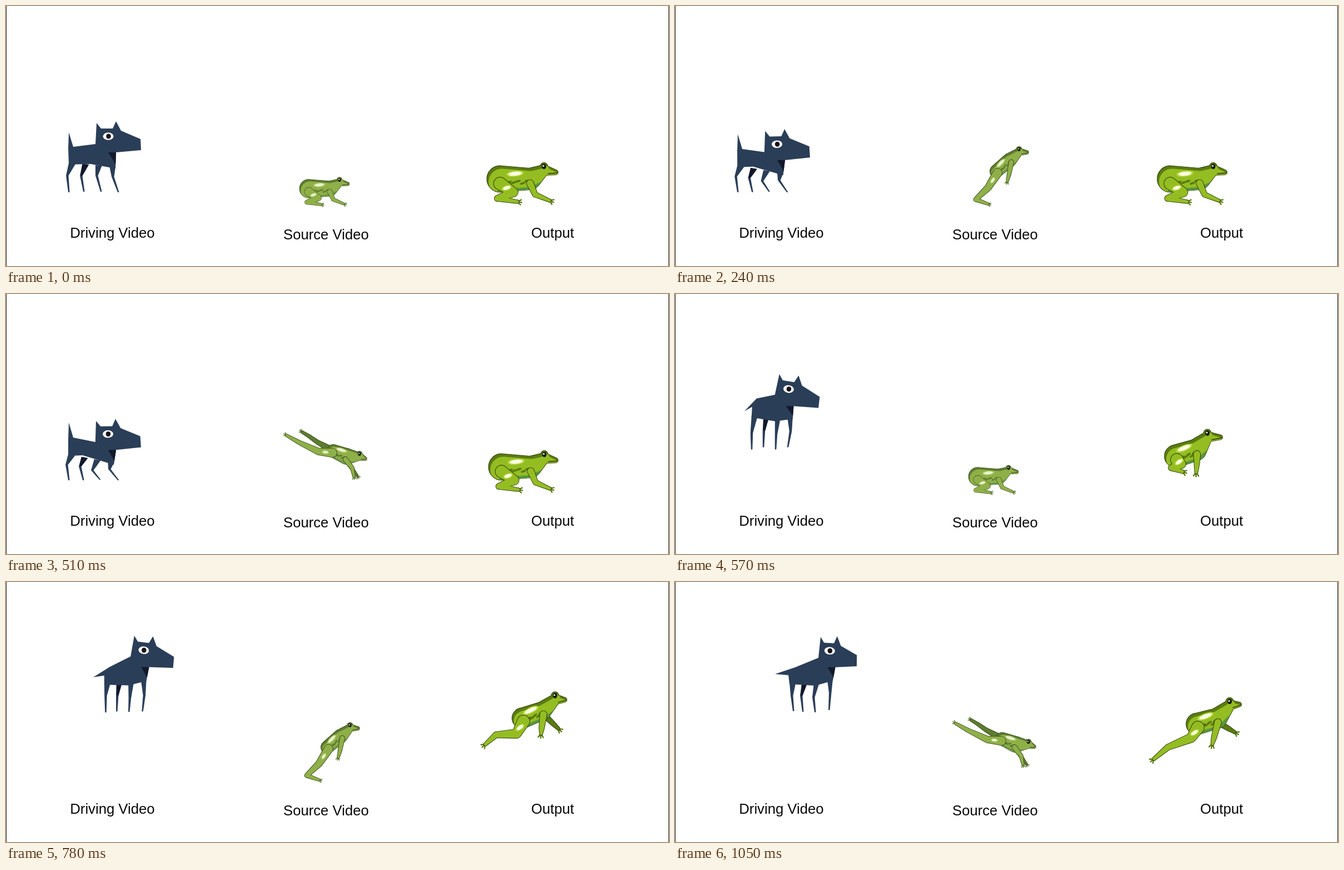
These frames come from a looping animation (1193x469 px, 1.08 s). An HTML page with a canvas:

```html
<!DOCTYPE html>
<html lang="en">
<head>
<meta charset="utf-8">
<title>Driving, source and output</title>
<style>
  html, body { margin: 0; width: 100%; height: 100%; overflow: hidden; background: #fff; }
  #stage { position: relative; width: 1193px; height: 469px; box-sizing: border-box;
    border: solid #2b2b2b; border-width: 0 1px; }
  canvas, svg { position: absolute; left: -1px; top: 0; }
  svg { font: 25.7px "Liberation Sans", Arial, sans-serif; fill: #080808; }
</style>
</head>
<body>
<div id="stage">
  <canvas id="view" width="1193" height="469"></canvas>
  <svg width="1193" height="469">
    <text x="115.3" y="418">Driving Video</text>
    <text x="499" y="421">Source Video</text>
    <text x="945" y="418">Output</text>
  </svg>
</div>
<script>
const LOOP = 1080, STEP = 30;
const ctx = document.getElementById('view').getContext('2d');

const lerp = (a, b, k) => a + (b - a) * k;
const between = (p, q, k) => [lerp(p[0], q[0], k), lerp(p[1], q[1], k)];
const pairs = (list) => list.flatMap((v, i) => i % 2 ? [] : [[v, list[i + 1]]]);

function dot(x, y, rx, ry, color, turn = 0) {
  ctx.fillStyle = color;
  ctx.beginPath();
  ctx.ellipse(x, y, rx, ry, turn, 0, 7);
  ctx.fill();
}

function polygon(points, color) {
  ctx.fillStyle = color;
  ctx.beginPath();
  for (const [x, y] of points) ctx.lineTo(x, y);
  ctx.fill();
}

// Tapered tube through joints [x, y] with one radius each.
function tube(joints, radii) {
  const path = new Path2D();
  joints.forEach(([x, y], i) => {
    const r = radii[i];
    path.moveTo(x + r, y);
    path.arc(x, y, r, 0, 2 * Math.PI);
    if (!i) return;
    const [px, py] = joints[i - 1], pr = radii[i - 1];
    const a = Math.atan2(y - py, x - px);
    const lean = Math.acos(Math.max(-1, Math.min(1, (pr - r) / Math.hypot(x - px, y - py))));
    const at = (cx, cy, cr, t) => [cx + cr * Math.cos(t), cy + cr * Math.sin(t)];
    path.moveTo(...at(px, py, pr, a - lean));
    path.lineTo(...at(x, y, r, a - lean));
    path.lineTo(...at(x, y, r, a + lean));
    path.lineTo(...at(px, py, pr, a + lean));
    path.closePath();
  });
  return path;
}

// Frog poses. spine: rump, chest, head, snout; leg: knee, ankle, toe; arm: elbow, hand.
const frog = (size, thick, spine, leg, arm, farHand, farLeg) =>
  ({ size, thick, spine: pairs(spine), leg: pairs(leg), arm: pairs(arm), farHand, farLeg: farLeg && pairs(farLeg) });

const sit = frog(1, [23.5, 19], [889, 312, 943, 312, 968, 296, 989, 300], [913, 336, 884, 347, 920, 353], [952, 340, 978, 351]);
const crouch = frog(0.7, [14, 13], [555, 318, 572, 302, 589, 285, 603, 282], [564, 341, 539, 346, 563, 357], [580, 322, 581, 347]);
const leapOff = frog(0.7, [11, 12], [578, 298, 602, 278, 619, 263, 633, 264], [563, 328, 541, 349, 563, 357], [601, 304, 598, 316]);
const stretch = frog(0.7, [10, 10], [588, 277, 622, 267, 644, 251, 656, 251], [560, 300, 527, 324, 500, 345], [616, 285, 614, 294], [625, 294]);
const leap = frog(0.7, [13, 13], [574, 260, 611, 259, 632, 266, 641, 271], [562, 284, 533, 299, 521, 316], [606, 282, 603, 294], [630, 290], [552, 267, 514, 271, 501, 283]);
const dive = frog(0.7, [11, 14], [589, 283, 613, 293, 636, 293, 646, 297], [562, 284, 528, 268, 505, 255], [623, 314, 626, 329], [632, 328], [560, 267, 546, 257, 533, 249]);
const rise = frog(1, [20, 19], [910, 270, 946, 259, 967, 235, 990, 236], [920, 284, 902, 291, 922, 298], [948, 284, 947, 299]);
const soar = frog(1, [18, 16], [940, 240, 976, 227, 999, 206, 1016, 207], [930, 268, 893, 270, 874, 287], [975, 258, 974, 268], [1005, 259]);
const glide = frog(1, [19, 18], [939, 256, 975, 246, 998, 222, 1015, 221], [929, 281, 887, 298, 862, 319], [970, 280, 967, 292], [1007, 271]);

const pale = { main: '#8fb048', dark: '#5d7c2e', belly: '#6c9a4b', shine: '#e9f1cd', glow: '#aecb6b', line: '#3b4922' };
const vivid = { main: '#94bd22', dark: '#5a7b10', belly: '#579540', shine: '#fcffe8', glow: '#b6da3e', line: '#28350a' };

function drawFrog({ size: w, thick, spine, leg, arm, farHand, farLeg }, ink) {
  const [rump, chest, head, snout] = spine;
  const turn = Math.atan2(chest[1] - rump[1], chest[0] - rump[0]);
  const below = ([x, y], d) => [x - d * Math.sin(turn), y + d * Math.cos(turn)];
  const hip = below(rump, thick[0] * 0.35), shoulder = below(chest, thick[1] * 0.4);

  const shape = (path, color) => {
    ctx.lineWidth = 1.8;
    ctx.strokeStyle = ink.line;
    ctx.stroke(path);
    ctx.fillStyle = color;
    ctx.fill(path);
  };
  const stroke = (points, color, width) => {
    ctx.strokeStyle = color;
    ctx.lineWidth = width;
    ctx.beginPath();
    for (const p of points) ctx.lineTo(...p);
    ctx.stroke();
  };
  const limb = (joints, radii, color) => {
    const [p, q] = joints.slice(-2), a = Math.atan2(q[1] - p[1], q[0] - p[0]);
    for (const spread of [-0.6, 0, 0.6]) {
      const tip = [q[0] + 8 * w * Math.cos(a + spread), q[1] + 8 * w * Math.sin(a + spread)];
      stroke([q, tip], ink.dark, 2.4 * w);
    }
    shape(tube(joints, radii.map((r) => r * w)), color);
  };
  const gleam = ([x, y], rx, ry, angle) => {
    dot(x, y, rx * 1.3, ry * 1.5, ink.glow, angle);
    dot(x, y, rx, ry, ink.shine, angle);
  };

  ctx.lineCap = ctx.lineJoin = 'round';
  if (farLeg) limb([rump, ...farLeg], [8, 5, 4, 3], ink.dark);
  if (farHand) limb([shoulder, between(shoulder, farHand, 0.6), farHand], [5, 4, 2.5], ink.dark);

  const eye = [head[0], head[1] - 6.5 * w];
  const torso = tube(spine, [...thick, 9 * w, 4 * w]);
  torso.addPath(tube([head, eye], [8 * w, 6.5 * w]));
  shape(torso, ink.dark);
  ctx.save();
  ctx.clip(torso);
  ctx.translate(3 * w, 5 * w);
  ctx.fillStyle = ink.main;
  ctx.fill(torso);
  ctx.translate(-3 * w, -5 * w);
  stroke([below(rump, thick[0]), below(chest, thick[1]), between(chest, snout, 0.7).map((v, i) => v + i * 13 * w)], ink.belly, 9 * w);
  for (let i = 0; i < 6; i++) {
    const [x, y] = below(between(rump, chest, 0.3 + i * 0.15), thick[1] * (0.3 + 0.12 * Math.sin(i * 9)));
    dot(x, y, 5 * w, 2 * w, ink.dark, turn - 0.3);
  }
  gleam(below(between(rump, chest, 0.5), -thick[1] * 0.5), 12 * w, 3.6 * w, turn - 0.1);
  ctx.restore();

  limb([hip, ...leg], [11, 8, 5, 2.8], ink.main);
  gleam(between(hip, leg[0], 0.5), 7 * w, 3 * w, turn - 0.3);
  limb([shoulder, ...arm], [6, 4.5, 2.5], ink.main);
  stroke([between(head, snout, 0.35).map((v, i) => v + i * 5 * w), [snout[0] + 3 * w, snout[1] + w]], ink.line, 1.5 * w);
  dot(eye[0], eye[1], 4 * w, 4.8 * w, '#14180a');
  dot(eye[0] - w, eye[1] - w, 1.6 * w, 1.6 * w, '#fff');
}

function place(pose, ink, dx, dy, sx = 1, sy = 1) {
  ctx.save();
  ctx.transform(sx, 0, 0, sy, dx, dy);
  drawFrog(pose, ink);
  ctx.restore();
}

// Dog pose: ear tip, tilt, head width; chest, belly, rump, hip, tail tip, tail root; knees; feet.
const stand = [163, 211, 0, 1, 197, 293, 152, 285, 113, 286, 112, 257, 113, 228, 121, 254,
  110, 306, 135, 306, 163, 306, 192, 308, 113, 336, 140, 335, 171, 335, 202, 336];
const duck = [162, 229, -0.02, 1, 194, 308, 138, 291, 112, 292, 112, 262, 113, 232, 121, 259,
  109, 308, 133, 311, 155, 318, 186, 316, 113, 336, 139, 336, 169, 335, 202, 336];
const hop = [208, 122, 0.16, 0.99, 232, 203, 200, 207, 158, 200, 159, 181, 145, 189, 167, 166,
  158, 228, 180, 224, 202, 230, 228, 225, 158, 258, 179, 254, 201, 258, 223, 254];
const peak = [248, 91, 0.1, 0.95, 268, 173, 237, 182, 191, 182, 190, 166, 166, 168, 202, 150,
  195, 200, 215, 200, 238, 205, 264, 200, 195, 230, 214, 229, 236, 229, 262, 229];
const fall = [262, 99, 0.06, 0.85, 284, 178, 252, 187, 206, 184, 204, 168, 180, 166, 216, 154,
  210, 205, 227, 205, 249, 208, 279, 200, 213, 233, 230, 234, 252, 235, 277, 231];
const launch = hop.map((v, i) => i === 2 || i === 3 ? v : v + (i % 2 ? 30 : -27));
const skull = pairs([-2, 38, 0, 0, 8, 10, 29, 10, 35, -3, 44, 14, 79, 29, 80, 49, 35, 53]);
const hips = [[0, 0.15], [0.29, 0.43], [0.57, 0.71], [0.87, 1]];

const mix = (a, b, kx, ky) => a.map((v, i) => lerp(v, b[i], i % 2 ? ky : kx));
const settle = (t) => 1 - (1 - Math.min(1, t / 390)) ** 1.74;

// Blends four stops of the jump: slowing on the way up, speeding up on the way down.
function jump(t, a, b, c, d) {
  if (t < 660) return mix(a, b, (t - 540) / 120, (t - 540) / 120);
  if (t < 870) { const k = (t - 660) / 210; return mix(b, c, k, 1 - (1 - k) ** 2); }
  const k = (t - 870) / 180;
  return mix(c, d, k, k * k);
}

function drawDog(t) {
  const p = t < 540 ? mix(stand, duck, settle(t), settle(t)) : jump(t, launch, hop, peak, fall);
  const [x0, y0, tilt, width] = p;
  const [chest, belly, rump, hip, tip, root, ...legs] = pairs(p.slice(4));
  const navy = '#2a3e58', night = '#13182b';
  const onHead = ([x, y]) => [
    x0 + x * width * Math.cos(tilt) - y * Math.sin(tilt),
    y0 + x * width * Math.sin(tilt) + y * Math.cos(tilt)
  ];
  for (const n of [1, 0, 2, 3]) {
    const [a, b] = hips[n].map((k) => between(rump, chest, k)).map(([x, y]) => [x, y - 3]);
    const [kx, ky] = legs[n], [fx, fy] = legs[n + 4];
    polygon([a, [kx - 2, ky], [fx - 1, fy], [fx + 1.5, fy], [kx + 2.5, ky], b], navy);
    if (n === 1) polygon([a, [kx - 1, ky], [kx + 2.5, ky], b], night);
  }
  const head = skull.map(onHead), jaw = head[8];
  polygon([...head, chest, between(chest, belly, 0.6), belly, rump, hip, tip, root], navy);
  polygon([[jaw[0] - 14, jaw[1]], jaw, between(jaw, chest, 0.75)], night);
  const [ex, ey] = onHead([21, 24]);
  dot(ex, ey, 9.5, 6.8, '#fff', tilt);
  dot(ex + 0.5, ey, 4.3, 4.6, '#191018');
}

const cycle = [[dive, 480], [leap, 390], [stretch, 300], [leapOff, 180], [crouch, 90], [sit, 0]];

function drawSource(t) {
  const [pose] = cycle.find(([, start]) => t % 540 >= start);
  if (pose === sit) place(pose, pale, -77.5, 111, 0.7, 0.7);
  else drawFrog(pose, pale);
}

function drawOutput(t) {
  if (t < 540) {
    const sx = 1 - 0.024 * settle(t);
    return place(sit, vivid, 994 * (1 - sx), 0, sx);
  }
  const [x, y] = jump(t, [-12, 30], [0, 0], [26, -30], [26, -14]);
  if (t < 750) place(rise, vivid, x, y);
  else if (t < 960) place(soar, vivid, x - 26, y + 30);
  else place(glide, vivid, x - 26, y + 14);
}

const begin = performance.now();
function render() {
  const t = Math.floor(((performance.now() - begin) % LOOP) / STEP) * STEP;
  ctx.clearRect(0, 0, 1193, 469);
  drawDog(t);
  drawSource(t);
  drawOutput(t);
  requestAnimationFrame(render);
}
render();
</script>
</body>
</html>
```
